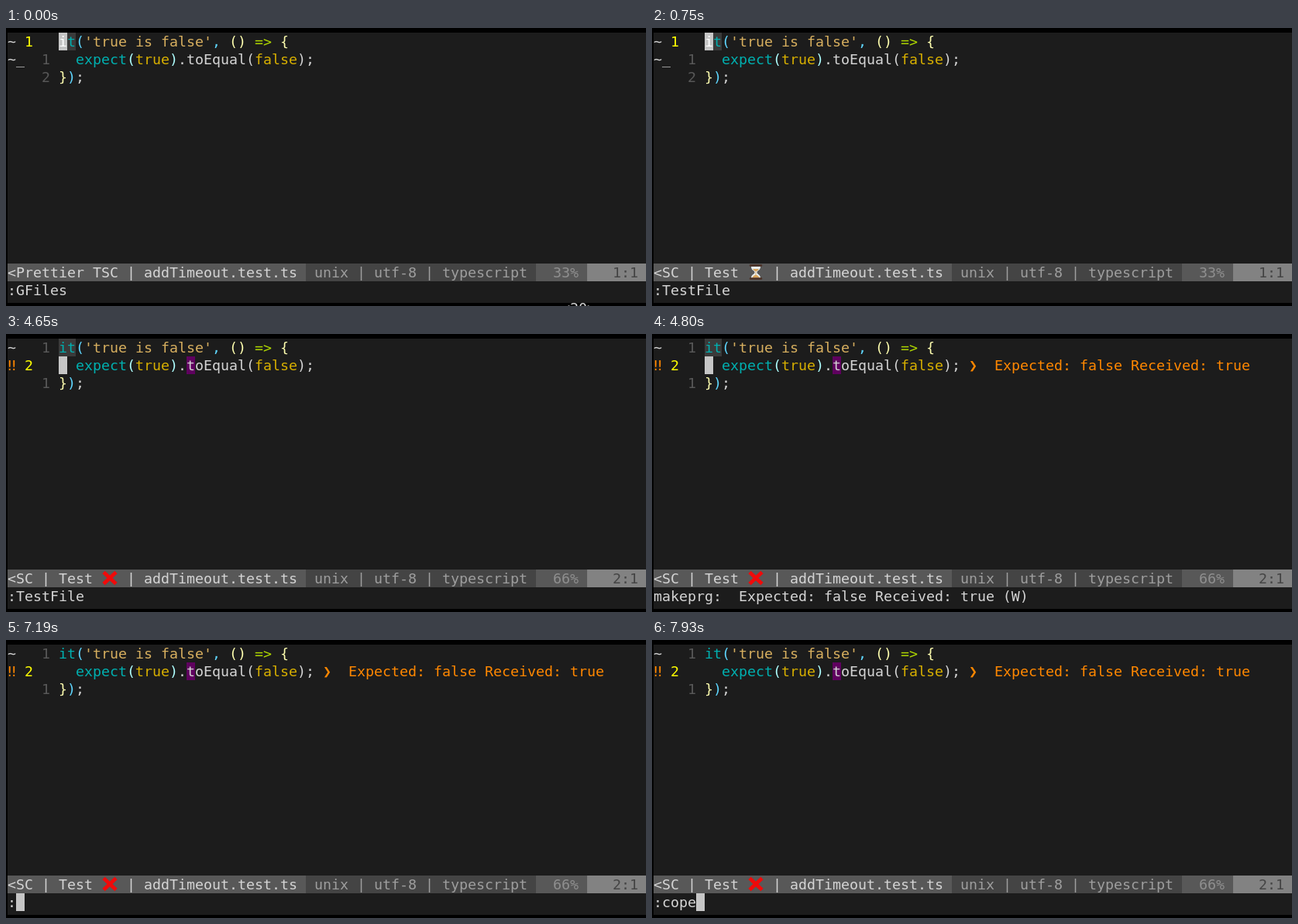
An HTML page for the animation above (8 s loop, 826 by 360 pixels).

```html
<!DOCTYPE html>
<html lang="en">
<head>
<meta charset="utf-8">
<title>Test run in an editor</title>
<style>
html, body { margin: 0; width: 100%; height: 100%; overflow: hidden; background: #000; }
#term {
  position: relative; width: 826px; height: 360px; overflow: hidden; color: #d4d4d4;
  background: linear-gradient(#1c1c1c, #1c1c1c) 2px 6px / 824px 350px no-repeat #000;
  font: 18.27px/23px "DejaVu Sans Mono", "Liberation Mono", monospace;
}

/* cells are 11 by 23 px, --x is the column and --y the row */
p, .box, svg {
  position: absolute; margin: 0; height: 23px; white-space: pre;
  left: calc(2px + var(--x, 0) * 11px); top: calc(6px + var(--y, 0) * 23px);
}
.box { width: calc(var(--w, 1) * 11px); }
i { font-style: normal; }
.teal { color: #00afaf; }
.gold { color: #d7af00; }
.str { color: #d7af5f; }
.sky { color: #5fd7ff; }
.pale { color: #ffffaf; }
.ice { color: #afffff; }
.lime { color: #afd700; }
.num { color: #585858; }
.cur { color: #ffff00; }
.warn { color: #ff8700; }
.block { background: #c6c6c6; color: #fff; }

.on { animation: 8s step-end infinite; }
.keys { animation-name: keys; }
.key2 { animation-name: key2; }
.idle { animation-name: idle; }
.wait { animation-name: wait; }
.start { animation-name: start; }
.run { animation-name: run; }
.ok { animation-name: ok; }
.fail { animation-name: fail; }
.line1 { animation-name: line1; }
.line2 { animation-name: line2; }
.cursor1 { animation-name: cursor1; }
.cursor2 { animation-name: cursor2; }
.match { animation-name: match; }
.note { animation-name: note; }
.msg { animation-name: msg; }
.prompt { animation-name: prompt; display: flex; }
.typed { animation-name: type; overflow: hidden; }
.prompt .block { width: 11px; }

@keyframes keys { 0% { opacity: 1 } 7.5%, to { opacity: 0 } }
@keyframes key2 { 0% { opacity: 0 } 3.75% { opacity: 1 } 7.5%, to { opacity: 0 } }
@keyframes idle { 0% { opacity: 1 } 9.375%, to { opacity: 0 } }
@keyframes start { 0% { opacity: 0 } 7.5% { opacity: 1 } 9.375%, to { opacity: 0 } }
@keyframes run { 0% { opacity: 0 } 7.5% { opacity: 1 } 60%, to { opacity: 0 } }
@keyframes wait { 0% { opacity: 0 } 9.375% { opacity: 1 } 35.625%, to { opacity: 0 } }
@keyframes ok { 0% { opacity: 1 } 35.625%, to { opacity: 0 } }
@keyframes fail { 0% { opacity: 0 } 35.625%, to { opacity: 1 } }
@keyframes line1 { 0% { opacity: 1 } 58.125%, to { opacity: 0 } }
@keyframes line2 { 0% { opacity: 0 } 58.125%, to { opacity: 1 } }
@keyframes cursor1 { 0% { opacity: 1 } 7.5% { opacity: 0 } 9.375% { opacity: 1 } 58.125%, to { opacity: 0 } }
@keyframes cursor2 { 0% { opacity: 0 } 58.125% { opacity: 1 } 89.875%, to { opacity: 0 } }
@keyframes match { 0% { opacity: 1 } 63.625%, to { opacity: 0 } }
@keyframes note { 0% { opacity: 0 } 60%, to { opacity: 1 } }
@keyframes msg { 0% { opacity: 0 } 60% { opacity: 1 } 89.875%, to { opacity: 0 } }
@keyframes prompt { 0% { opacity: 0 } 89.875%, to { opacity: 1 } }
@keyframes type {
  0% { width: 0 } 93.5% { width: 11px } 95.375% { width: 22px }
  97.25% { width: 33px } 99.125%, to { width: 44px }
}
</style>
</head>
<body>
<div id="term">
  <!-- sign column and line numbers -->
  <p>~</p>
  <p class="on ok" style="--y:1">~_</p>
  <p class="on fail warn" style="--y:1">‼</p>
  <div class="on line1">
    <p class="cur" style="--x:2">1</p>
    <p class="num" style="--x:4;--y:1">1</p>
    <p class="num" style="--x:4;--y:2">2</p>
  </div>
  <div class="on line2">
    <p class="num" style="--x:4">1</p>
    <p class="cur" style="--x:2;--y:1">2</p>
    <p class="num" style="--x:4;--y:2">1</p>
  </div>

  <!-- code -->
  <div class="box on match" style="--x:6;--w:2;background:#3a3a3a"></div>
  <div class="box on fail" style="--x:21;--y:1;background:#5f005f"></div>
  <p style="--x:6"><i class="teal">it</i><i class="sky">(</i><i class="str">'true is false'</i><i class="sky">,</i> <i class="pale">()</i> <i class="lime">=&gt;</i> <i class="pale">{</i></p>
  <p style="--x:8;--y:1"><i class="teal">expect</i><i class="ice">(</i><i class="gold">true</i><i class="ice">)</i>.toEqual(<i class="gold">false</i>);</p>
  <p style="--x:6;--y:2"><i class="pale">}</i><i class="sky">)</i>;</p>
  <div class="on note warn">
    <p style="--x:37;--y:1">❯</p>
    <p style="--x:40;--y:1">Expected: false Received: true</p>
  </div>
  <div class="box block on cursor1" style="--x:6">i</div>
  <div class="box block on cursor2" style="--x:6;--y:1"></div>

  <!-- status line -->
  <div style="--y:13">
    <div class="box" style="--w:35;background:#585858"></div>
    <div class="box" style="--x:35;--w:27;background:#444;color:#9e9e9e"> unix | utf-8 | typescript</div>
    <div class="box" style="--x:62;--w:6;background:#585858;color:#8f8f8f"><p class="on line1" style="left:22px;top:0">33%</p><p class="on line2" style="left:22px;top:0">66%</p></div>
    <div class="box" style="--x:68;--w:7;background:#828282;color:#444"><p class="on line1" style="left:33px;top:0">1:1</p><p class="on line2" style="left:33px;top:0">2:1</p></div>
    <p class="on idle">&lt;Prettier TSC</p>
    <p class="on wait">&lt;SC | Test</p>
    <p class="on fail">&lt;SC | Test</p>
    <p style="--x:14">| addTimeout.test.ts</p>
    <svg class="on wait" style="--x:11" width="22" height="23">
      <path d="M5 4H17C17 9 12.5 9 12.5 11.5S17 14 17 19H5C5 14 9.5 14 9.5 11.5S5 9 5 4Z" fill="#e9eef0"/>
      <path d="M7 7H15Q14 9 11 10.5Q8 9 7 7ZM6 18.500Q8 15 11 14.500Q14 15 16 18.500ZM10.600 10H11.400V16H10.600Z" fill="#d9a45b"/>
      <path d="M4 2.500H18M4 19.500H18" stroke="#4b3025" stroke-width="2.500" stroke-linecap="round"/>
    </svg>
    <svg class="on fail" style="--x:11" width="22" height="23">
      <path d="M3 3.500L19 18.500M19 3.500L3 18.500" stroke="#f00a0a" stroke-width="4.800"/>
    </svg>
  </div>

  <!-- command line -->
  <div style="--y:14">
    <p class="on keys">:GFiles</p>
    <p class="on run">:TestFile</p>
    <div class="box block on start">:</div>
    <p class="on msg">makeprg:  Expected: false Received: true (W)</p>
    <p class="on prompt"><i>:</i><i class="on typed">cope</i><i class="block"></i></p>
  </div>
  <p class="on keys" style="--x:65;--y:15">&lt;20&gt;</p>
  <p class="on key2" style="--x:69;--y:15">t</p>
</div>
</body>
</html>
```
